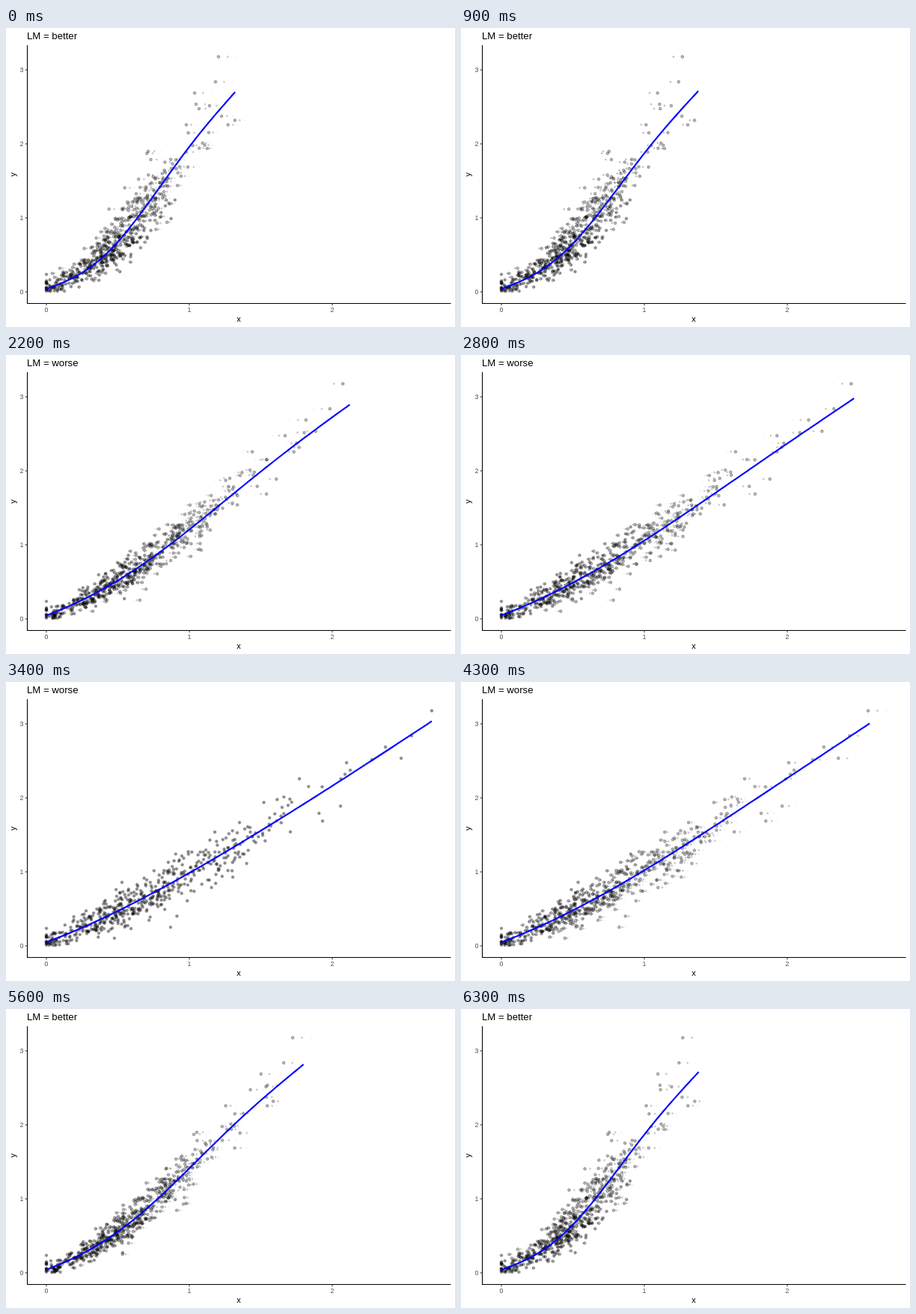
These frames come from a looping animation (600x400 px, 6.4 s). An HTML page with a canvas:

```html
<!DOCTYPE html>
<html lang="en">
<head>
<meta charset="utf-8">
<title>LM comparison</title>
<style>
  html, body { margin: 0; width: 100%; height: 100%; overflow: hidden; background: #fff; }
  svg, canvas { position: absolute; left: 0; top: 0; width: 600px; height: 400px; }
  text { font-family: "Liberation Sans", Arial, sans-serif; font-size: 11px; }
  .tick text { font-size: 8.8px; fill: #4d4d4d; }
  .tick path { stroke: #333; stroke-width: 1.07; }
  #title { font-size: 13.2px; }
  .mid { text-anchor: middle; }
</style>
</head>
<body>
<svg viewBox="0 0 600 400">
  <text id="title" x="28" y="15">LM = better</text>
  <path d="M28.5 23V368.5H594.5" fill="none" stroke="#000" stroke-width="1.07"/>
  <g class="tick" id="ticks"></g>
  <text class="mid" x="311" y="393">x</text>
  <text class="mid" transform="translate(13 196) rotate(-90)">y</text>
</svg>
<canvas id="plot" width="600" height="400"></canvas>
<script>
const LOOP = 6400, STEP = 100, X0 = 54, Y0 = 353, UX = 191, UY = 99;
const title = document.getElementById('title');
const ctx = document.getElementById('plot').getContext('2d');
const px = x => X0 + x * UX;
const py = y => Y0 - y * UY;
const lerp = (a, b, w) => a + (b - a) * w;

let ticks = '';
for (let i = 0; i < 4; i++) {
  const x = px(i), y = py(i);
  ticks += `<path d="M25.6 ${y}H28.5"/><text x="23.4" y="${y + 3.2}" text-anchor="end">${i}</text>`;
  if (i < 3) ticks += `<path d="M${x} 368.5V371.3"/><text class="mid" x="${x}" y="380">${i}</text>`;
}
document.getElementById('ticks').innerHTML = ticks;

// Fitted curves in data units
const END_A = 1.32, END_B = 2.696;
function betterFit(x) {
  const a = Math.PI * x / END_A;
  return 0.04 + 2.015 * x - 0.31 * Math.sin(a) - 0.12 * Math.sin(2 * a);
}
const worseFit = x => 0.05 + 0.715 * x + 0.6 * (x - 1 + Math.exp(-x));

function betterX(y) {
  let lo = 0, hi = END_A;
  for (let i = 0; i < 16; i++) {
    const m = (lo + hi) / 2;
    if (betterFit(m) < y) lo = m; else hi = m;
  }
  return lo;
}

let seed = 7;
function rand() {
  seed = (seed + 0x6D2B79F5) | 0;
  let t = Math.imul(seed ^ seed >>> 15, 1 | seed);
  t = t + Math.imul(t ^ t >>> 7, 61 | t) ^ t;
  return ((t ^ t >>> 14) >>> 0) / 4294967296;
}
const gauss = () => Math.sqrt(-2 * Math.log(1 - rand())) * Math.cos(2 * Math.PI * rand());

// Outermost points: y, x when better, x when worse
const dots = [
  [3.177, 1.204, 2.696], [2.838, 1.183, 2.555], [2.687, 1.037, 2.372],
  [2.535, 1.047, 2.482], [2.515, 1.141, 2.277], [2.475, 1.068, 2.1],
  [2.374, 1.225, 2.126], [2.318, 1.319, 2.089], [2.258, 0.979, 1.77],
  [1.899, 0.712, 1.691], [1.889, 0.979, 2.058], [1.687, 0.99, 1.932]
];
while (dots.length < 540) {
  const b = Math.max(0, Math.abs(0.72 + 0.5 * gauss()) - 0.07);
  const y = Math.abs(worseFit(b) + (0.09 + 0.07 * Math.min(b, 1)) * gauss());
  const a = b ? Math.abs(betterX(y) + 0.09 * gauss()) : 0;
  if (y < 2.4) dots.push([y, a, b]);
}

// 0 = better, 1 = worse
function mix(ms) {
  const t = (ms + LOOP) % LOOP;
  if (t < 800) return 0;
  if (t < 3200) return (t - 800) / 2400;
  if (t < 4100) return 1;
  return 1 - (t - 4100) / 2300;
}

function drawDots(w, r, alpha, ring) {
  ctx.fillStyle = ctx.strokeStyle = `rgba(0,0,0,${alpha})`;
  ctx.lineWidth = ring;
  for (const [y, a, b] of dots) {
    ctx.beginPath();
    ctx.arc(px(lerp(a, b, w)), py(y), r, 0, 2 * Math.PI);
    ctx.fill();
    if (ring) ctx.stroke();
  }
}

function drawLine(w) {
  const end = lerp(END_A, END_B, w), lift = 0.06 * Math.sin(Math.PI * w);
  ctx.beginPath();
  for (let i = 0; i < 80; i++) {
    const f = i / 79;
    const y = lerp(betterFit(f * END_A), worseFit(f * END_B), w);
    ctx.lineTo(px(f * end), py(y + lift * Math.sin(Math.PI * f ** 1.3)));
  }
  ctx.strokeStyle = '#00f';
  ctx.lineWidth = 2.13;
  ctx.lineJoin = 'round';
  ctx.stroke();
}

function draw(t) {
  const w = mix(t);
  ctx.clearRect(0, 0, 600, 400);
  drawDots(mix(t - 2 * STEP), 0.8, 0.1, 0);
  drawDots(mix(t - STEP), 1.4, 0.2, 0);
  drawDots(w, 1.96, 0.3, 0.71);
  drawLine(w);
  title.textContent = 'LM = ' + (w < 0.5 ? 'better' : 'worse');
}

let last = -1;
const start = performance.now();
function frame() {
  const t = Math.floor((performance.now() - start) % LOOP / STEP) * STEP;
  if (t !== last) draw(last = t);
  requestAnimationFrame(frame);
}
frame();
</script>
</body>
</html>
```
